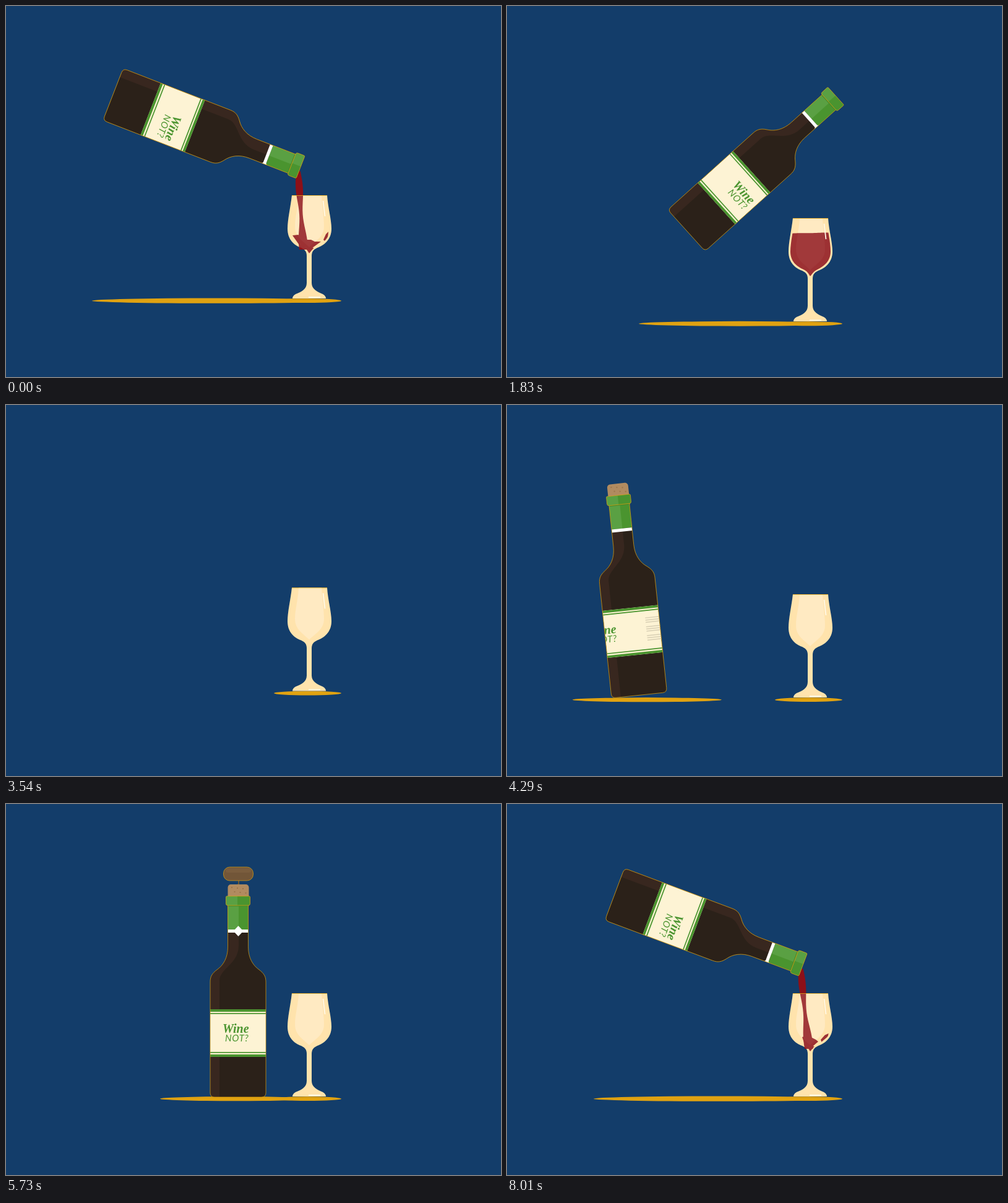
Write an HTML page with a canvas that moves like this. It is 800x600 px and loops after 8040 ms.

```html
<!DOCTYPE html>
<html lang="en">
<head>
<meta charset="utf-8">
<title>Pouring wine</title>
<style>
html, body { margin: 0; width: 100%; height: 100%; overflow: hidden; background: #133d6a; }
canvas { display: block; }
</style>
</head>
<body>
<canvas id="stage" width="800" height="600"></canvas>
<script>
const c = document.getElementById('stage').getContext('2d');
const LOOP = 8040, REST = 375, FLOOR = 474;
const GOLD = '#e0a211', GREEN = '#4a942f', LIGHT = '#5aa043', WINE = '#8c1018';

const bottle = new Path2D('M-38 0Q-45 0-45-7V-186C-45-195-42-200-34-206C-24-213-16.5-225-16.5-243V-318H16.5V-243C16.5-225 24-213 34-206C42-200 45-195 45-186V-7Q45 0 38 0Z');
const sheen = new Path2D('M-46 0H-30V-188C-30-208 1-215 1-245V-330H-46Z');
const collar = new Path2D('M-18-325H18Q19.5-325 19.5-323V-313Q19.5-310 17-310H-17Q-19.5-310-19.5-313V-323Q-19.5-325-18-325Z');
const glass = new Path2D('M462 306H519C520 325 526 345 526 360C526 378 514 387 503 391C497 394 494 397 494 404V448C494 458 503 462 512 466Q517 469 517 473H463Q463 469 468 466C478 462 486 458 486 448V404C486 397 483 394 477 391C466 387 455 378 455 360C455 345 460 325 462 306Z');
const cavity = new Path2D('M465 306H516C518 325 523 345 523 360C523 376 512 384 502 389C495 392 494 396 490 400C487 396 486 392 479 389C468 384 458 376 458 360C458 345 463 325 465 306Z');
const core = new Path2D('M473 306H510C511 325 514 342 514 356C514 374 500 380 490 390C480 380 467 374 467 356C467 342 472 325 473 306Z');

// time, base x, base y, angle, label turn, shadow x, shadow width
const POUR = [
  [-1300, 375, 474, 0, 0, 369.5, 241],
  [-1150, 375, 474, 0, 0, 369.5, 250],
  [-870, 353, 451, 9.4, 7.5, 358, 346],
  [-590, 235, 330, 55, 14, 348, 368],
  [-240, 180, 166, 103, 19, 340, 390],
  [-30, 174, 146, 110.5, 20, 339, 398],
  [0, 173, 143, 111.2, 20, 338, 398],
  [400, 176, 134, 115, 20, 330, 418],
  [850, 174, 140, 112, 20, 345, 389],
  [1250, 190, 170, 98, 20, 358, 366],
  [1640, 261, 282, 63, 20, 372, 342],
  [1830, 290, 326, 48, 20, 376, 326],
  [2250, 350, 430, 13, 20, 373, 275],
  [2700, 375, 476, -1, 20, 369.5, 241],
  [3060, 375, 474, 0, 20, 369.5, 241]
];
const SCREW = [[4650, -220], [5050, -40], [5150, -28], [5650, 0], [5800, 0], [6000, 2], [6350, -37], [6540, -36], [6740, -340]];
const LEVEL = [[-120, 401], [-30, 391], [0, 388], [150, 381], [700, 350], [1250, 330], [3060, 330]];

// Smooth curve through rows of [time, ...values]
function track(rows, t) {
  const last = rows.length - 1;
  if (t <= rows[0][0]) return rows[0].slice(1);
  if (t >= rows[last][0]) return rows[last].slice(1);
  const i = rows.findIndex(r => r[0] > t) - 1, a = rows[i], b = rows[i + 1];
  const d = b[0] - a[0], s = (t - a[0]) / d;
  const slope = (n, k) => {
    if (n === 0 || n === last) return 0;
    const p = rows[n - 1], q = rows[n], r = rows[n + 1];
    const m = (q[k] - p[k]) / (q[0] - p[0]), o = (r[k] - q[k]) / (r[0] - q[0]);
    return m * o <= 0 ? 0 : 2 * m * o / (m + o);
  };
  return a.slice(1).map((v, j) => {
    const k = j + 1, w = b[k];
    return v + (w - v) * s * s * (3 - 2 * s)
      + d * s * (1 - s) * ((1 - s) * slope(i, k) - s * slope(i + 1, k));
  });
}

const inOut = s => s < 0.5 ? 4 * s ** 3 : 1 - 4 * (1 - s) ** 3;
const clamp = s => Math.max(0, Math.min(1, s));

function fill(color, path) { c.fillStyle = color; path ? c.fill(path) : c.fill(); }
function box(color, x, y, w, h) { c.fillStyle = color; c.fillRect(x, y, w, h); }
function edge(path) { c.strokeStyle = GOLD; c.lineWidth = 0.7; path ? c.stroke(path) : c.stroke(); }
function clipped(path, draw) { c.save(); c.clip(path); draw(); c.restore(); }
function oval(x, rx, ry) {
  c.beginPath();
  c.ellipse(x, 476.7, rx, ry, 0, 0, 7);
  fill(GOLD);
}
function shape(color, ...p) {
  c.beginPath();
  for (let i = 0; i < p.length; i += 2) c.lineTo(p[i], p[i + 1]);
  fill(color);
}

function drawCork(t) {
  const y = track(SCREW, t)[0], lift = t > 5800 ? Math.min(0, y) : 0;
  c.save();
  c.translate(0, lift);
  c.beginPath();
  c.roundRect(-16.5, -344, 34, 38, 5);
  fill('#b18b60');
  for (let i = 0; i < 6; i++) box('#9c774c', -11 + i * 4.5, -340 + i * 7 % 13, 2, 2);
  c.restore();
  if (t < 4650) return;
  const turn = t > 5050 && t < 5650 ? Math.abs(Math.cos((t - 5050) / 600 * Math.PI * 4)) : 1;
  const w = 11 + 13 * turn;
  c.save();
  c.beginPath();
  c.rect(-60, -700, 120, 700 - 344 + lift);
  c.clip();
  c.translate(0, y);
  c.strokeStyle = '#6b5a3a';
  c.lineWidth = 2;
  c.beginPath();
  for (let i = 0; i <= 34; i++) c.lineTo(1 + (i < 8 ? 0 : 4 * Math.sin(i * 0.7)), -351 + i);
  c.stroke();
  c.beginPath();
  c.roundRect(-w + 0.5, -372, w * 2, 22, 10);
  fill('#725638');
  edge();
  c.beginPath();
  c.roundRect(-w + 4, -370, w * 2 - 7, 7, 4);
  fill('#7a5d3e');
  c.restore();
}

function drawLabel(turn) {
  const area = new Path2D();
  area.rect(-45, -142, 90, 77);
  clipped(area, () => {
    box('#fdf3d4', -45, -142, 90, 77);
    for (const [y, h] of [[-142, 4], [-136, 1.7], [-73, 1.7], [-69, 4]]) box(GREEN, -45, y, 90, h);
    c.fillStyle = GREEN;
    c.font = 'italic bold 20px "Liberation Serif", serif';
    c.fillText('Wine', turn - 25, -104);
    c.font = 'italic 15px Lato, sans-serif';
    c.letterSpacing = '0.7px';
    c.fillText('NOT?', turn - 21, -90);
    c.letterSpacing = '0px';
    for (let i = 0; i < 11; i++)
      if (i % 4 < 3) box('#d8cfb4', 66 + turn, -124 + i * 3.6, 50, 1.5);
  });
}

function drawBottle(t, x, y, angle, turn) {
  c.save();
  c.translate(x, y);
  c.rotate(angle * Math.PI / 180);
  if (t > 3060 && t < 6740) drawCork(t);
  fill('#2b2119', bottle);
  clipped(bottle, () => {
    fill('#38271f', sheen);
    box(GREEN, -17, -312, 34, 41);
    box(LIGHT, -17, -312, 18, 41);
    box('#43872c', -17, -311, 34, 2.5);
    box('#fff', -17, -271, 34, 5);
    shape('#fff', turn - 7.5, -268.5, turn + 0.5, -277, turn + 8.5, -268.5, turn + 0.5, -260);
  });
  drawLabel(turn);
  edge(bottle);
  fill(GREEN, collar);
  clipped(collar, () => box(LIGHT, -20, -326, 19, 17));
  edge(collar);
  if (t > 6950 && t < 7260)
    for (const [dx, dy] of [[-8, -354], [8, -351.5], [-12, -339], [3.5, -336]]) box(GOLD, dx, dy, 1.2, 1.2);
  c.restore();
}

function drawStream(u, mouthX, mouthY, level) {
  const fall = clamp((u + 260) / 190), stop = clamp((u - 820) / 200);
  if (fall <= 0 || stop >= 1) return;
  const endX = u < 0 ? Math.min(489, 481 - u * 0.23) : 481 + 3 * Math.sin(u / 150);
  const foot = Math.min(396, level + 6);
  const top = mouthY + 5 + (foot - mouthY) * stop, end = mouthY + (foot - mouthY) * fall;
  const thick = 1 - 0.6 * stop;
  const left = [], right = [];
  for (let i = 0; i <= 20; i++) {
    const y = top + (end - top) * i / 20, s = (y - mouthY) / (foot - mouthY);
    const x = mouthX + (endX - mouthX) * s ** 1.15;
    const w = (3.5 + 1.9 * Math.sin(s * 9 - 0.5 - u / 130) + 2 * s) * thick;
    left.push(x - w, y);
    right.unshift(x + w, y);
  }
  const back = [];
  for (let i = 0; i < right.length; i += 2) back.push(right[i], right[i + 1]);
  shape(WINE, ...left, ...back);
}

function drawWine(u, level) {
  if (u < -100) return;
  const wave = 4 * Math.exp(-Math.max(0, u) / 600) * clamp((u + 60) / 60);
  const curl = 7 * clamp(u / 90) * Math.exp(-Math.max(0, u) / 350);
  clipped(cavity, () => {
    const top = [];
    for (let x = 455; x <= 527; x += 3) {
      const e = (x - 490) / 33;
      top.push(x, level - curl * e * e + wave * Math.sin(x / 6 + u / 70) - e * 0.6);
    }
    shape(WINE, ...top, 527, 402, 455, 402);
    if (u < 200) {
      const g = clamp((u + 45) / 45), sink = Math.max(0, u) * 0.08;
      c.save();
      c.translate(0, sink);
      shape(WINE, 484 - 21 * g, 380 - 9 * g, 484 - 12 * g, 379 - 9 * g, 487, 378, 493, 378, 499, 381, 500 + 9 * g, 386 - 5 * g, 494, 392, 484 - 9 * g, 388);
      shape(WINE, 504 + 9 * g, 383 - 5 * g, 512 + 5 * g, 376 - 7 * g, 519 + 2 * g, 374 - 9 * g, 518 + 2 * g, 376, 505 + 10 * g, 387 - 7 * g);
      c.restore();
    }
  });
}

// Floor travel: sinks away, then a fresh scene drops in and shakes at each hit
function floorShift(t, u) {
  if (u < 3060) {
    const sink = u > 420 ? ((u - 420) * 0.00175) ** 4 : 0;
    return sink + shake(t);
  }
  return -480 * (1 - clamp((t - 3060) / 900)) ** 5 + shake(t);
}
function shake(t) {
  return [[5130, 9], [5960, 4], [6540, 9]].reduce((sum, [hit, size]) => {
    const d = t - hit;
    return d > 0 && d < 700 ? sum + size * Math.exp(-d / 90) * Math.sin(d / 55) : sum;
  }, 0);
}

function draw(t) {
  const u = t >= 6740 ? t - LOOP : t;
  const fresh = u >= 3060;
  let pose;
  if (fresh) {
    const x = -150 + 525 * inOut(clamp((t - 3600) / 1200));
    const lean = t < 5100 ? -6 * Math.exp(-(((t - 4290) / 250) ** 2)) : 0;
    const lift = 45 * Math.sin(Math.abs(lean) * Math.PI / 180);
    pose = [x, FLOOR - lift, lean, (x - REST) * 0.27, x - 5.5 - lean * 3, 241];
  } else pose = track(POUR, u);
  const [x, y, angle, turn, shadowX, shadowW] = pose;

  box('#133d6a', 0, 0, 800, 600);
  c.save();
  c.translate(0, floorShift(t, u));
  oval(487.5, 54.5, 3.4);
  oval(shadowX, shadowW / 2, 2.7 + shadowW / 270);

  fill('#ffe2a6', glass);
  fill('#ffe8bd', core);
  if (!fresh) {
    const rad = angle * Math.PI / 180, level = track(LEVEL, u)[0];
    drawStream(u, x + 321 * Math.sin(rad), y - 321 * Math.cos(rad) + 3, level);
    drawWine(u, level);
  }
  fill('rgba(255,235,205,.15)', glass);
  fill('rgba(255,240,220,.04)', core);
  box(GOLD, 462, 306, 57, 0.8);
  c.strokeStyle = '#fff8e6';
  c.lineWidth = 1.8;
  c.beginPath();
  c.moveTo(512.5, 315);
  c.lineTo(515.5, 340);
  c.moveTo(489, 471);
  c.lineTo(508, 471);
  c.stroke();

  drawBottle(t, x, y, angle, turn);
  c.restore();
}

const start = performance.now();
function frame() {
  const t = (performance.now() - start) % LOOP;
  draw(Math.floor(t / 30) * 30);
  requestAnimationFrame(frame);
}
frame();
</script>
</body>
</html>
```
